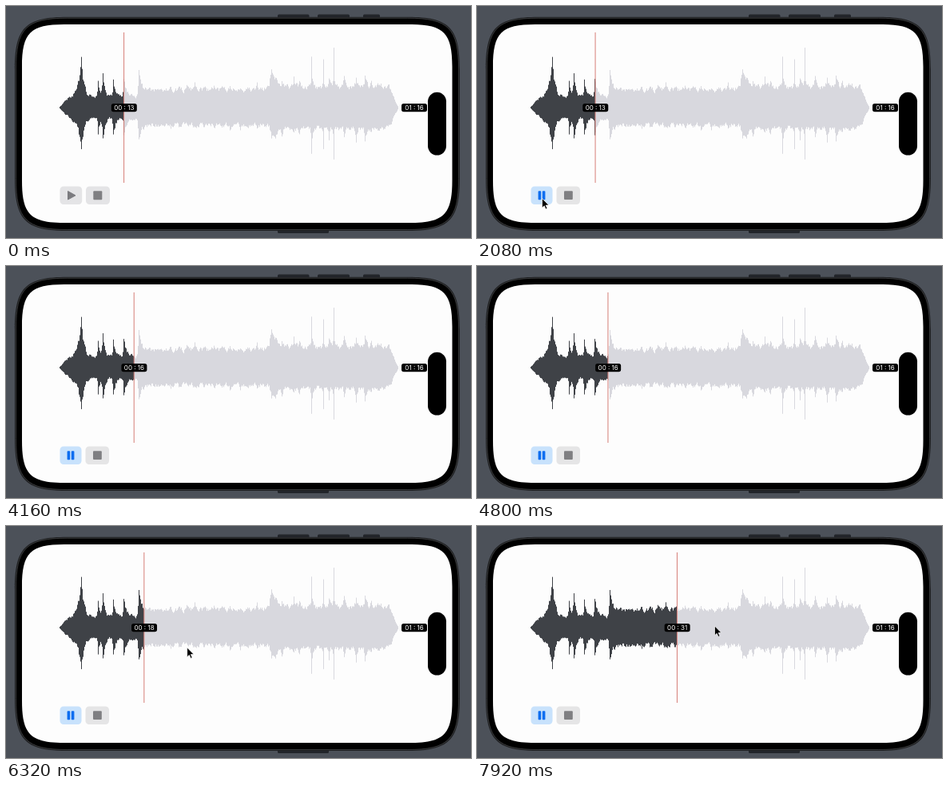
Animation, 582 px wide and 290 px high, one loop 8000 ms. Source, as an HTML page:

```html
<!DOCTYPE html>
<html lang="en">
<head>
<meta charset="utf-8">
<title>Audio player</title>
<style>
  html, body { margin: 0; width: 100%; height: 100%; overflow: hidden; background: #4c5159; }
  svg { display: block; width: 582px; height: 290px; }
  text { font: 400 8px Inter, "Liberation Sans", sans-serif; fill: #fff; text-anchor: middle; white-space: pre; }
  .wave { fill: none; stroke-width: 1; }
</style>
</head>
<body>
<svg viewBox="0 0 582 290">
  <defs>
    <clipPath id="played"><rect id="playedRect" x="60" y="30" width="88" height="200"/></clipPath>
  </defs>

  <!-- phone -->
  <g fill="#22252a">
    <rect x="340" y="10.500" width="39.500" height="5" rx="1.500"/>
    <rect x="390" y="10.500" width="40" height="5" rx="1.500"/>
    <rect x="447" y="10.500" width="21" height="5" rx="1.500"/>
    <rect x="340" y="279" width="64" height="5" rx="1.500"/>
  </g>
  <path id="rim" fill="#1d1e20"/>
  <path id="bezel" fill="#000" stroke="#4b4c4e" stroke-width=".7"/>
  <path id="screen" fill="#fdfdfd"/>
  <rect x="528" y="107.800" width="23" height="78.800" rx="11.500" fill="#000"/>

  <!-- waveform -->
  <path class="wave" id="rest" stroke="#d8d8de"/>
  <path class="wave" id="done" stroke="#3f4247" clip-path="url(#played)"/>
  <rect id="line" y="33" width="1" height="188" fill="#d67f78"/>

  <g id="clock">
    <rect x="-16" y="122" width="32" height="10.300" rx="2.700"/>
    <text id="time" y="130">00 : 13</text>
  </g>
  <g transform="translate(511 0)">
    <rect x="-16" y="122" width="32" height="10.300" rx="2.700"/>
    <text y="130">01 : 16</text>
  </g>

  <!-- buttons -->
  <g id="idle">
    <rect x="67.500" y="225.500" width="27.700" height="22.500" rx="4.500" fill="#e4e4e6"/>
    <path d="M77.500 231.500 L87 236.800 L77.500 242Z" fill="#7b7b7f" stroke="#7b7b7f" stroke-linejoin="round"/>
    <rect x="100" y="225.500" width="30" height="22.500" rx="4.500" fill="#e4e4e6"/>
    <rect x="109.300" y="231.300" width="11" height="11" rx="1" fill="#7f7f82"/>
  </g>
  <g id="playing">
    <rect x="67.500" y="225.500" width="27" height="22.500" rx="4.500" fill="#c8e2fc"/>
    <g fill="#0d6ef0">
      <rect x="76.600" y="231.300" width="3.600" height="11" rx=".8"/>
      <rect x="81.800" y="231.300" width="3.600" height="11" rx=".8"/>
    </g>
    <rect x="99.500" y="225.500" width="29.500" height="22.500" rx="4.500" fill="#e5e5e6"/>
    <rect x="109" y="231.300" width="10.800" height="10.800" rx="1" fill="#7f7f82"/>
  </g>

  <g id="cursor">
    <path d="M0 0V13.500L3.100 10.700L5.200 15.400L7.400 14.400L5.300 9.900L9.600 9.700Z" transform="scale(.87)"
          fill="#000" stroke="#fff" stroke-width=".8" stroke-linejoin="round"/>
  </g>
</svg>

<script>
const $ = id => document.getElementById(id);
const LOOP = 8000, STEP = 80, MID = 127, FIRST = 67, LAST = 490;
const ORIGIN = 66.6, SPEED = 5.84; // track start, px per second
const PLAY = 2000, GRAB = 6640, DROP = 7360;

const clamp = k => Math.min(1, Math.max(0, k));
const mix = (a, b, k) => a + (b - a) * k;
const ease = k => k * k * (3 - 2 * k);
let seed = 11;
const random = () => (seed = (seed * 16807) % 2147483647) / 2147483647;

// rectangle with continuous corners, whose curve reaches further than an arc
function squircle(x, y, w, h, radius) {
  const e = radius * 1.465, k = e * 0.8, m = e - k;
  return `M${x + e} ${y}h${w - 2 * e}c${k} 0 ${e} ${m} ${e} ${e}` +
    `v${h - 2 * e}c0 ${k} ${-m} ${e} ${-e} ${e}` +
    `h${2 * e - w}c${-k} 0 ${-e} ${-m} ${-e} ${-e}` +
    `v${2 * e - h}c0 ${-k} ${m} ${-e} ${e} ${-e}z`;
}
$("rim").setAttribute("d", squircle(11, 13.700, 557, 267.300, 45));
$("bezel").setAttribute("d", squircle(12.500, 15.200, 554, 264.300, 43.500));
$("screen").setAttribute("d", squircle(20, 23, 538.500, 248, 36));

// loud moments: x, height, attack and decay in px
const bursts = [
  [94, 42, 4, 3.500], [115, 22, 0.700, 2], [121, 29, 1, 2.500], [134, 20, 0.800, 3],
  [147, 21, 0.700, 4], [166, 26, 0.700, 3], [332, 18, 2, 3],
  [382, 36, 0.500, 0.700], [397, 32, 0.500, 0.500], [410, 46, 0.500, 0.500]
];
for (let x = 180; x < 476; x += 11) {
  bursts.push([Math.round(x + 5 * random()), (x < 330 ? 9 : 17) * random(), 1, 1.500]);
}

function loudness(x) {
  const base = x < 165 ? 13 : x < 330 ? 22 : 26;
  const fade = clamp((x - FIRST + 1) / 13) * clamp((LAST + 1 - x) / 12);
  return fade * bursts.reduce((sum, [center, height, attack, decay]) => {
    const d = x - center;
    return sum + height * Math.exp(d < 0 ? d / attack : -d / decay);
  }, base);
}

function edge(gain) {
  let drift = 0;
  return x => {
    drift = 0.55 * drift + 0.24 * (random() - 0.5);
    return gain * loudness(x) * (1 + drift);
  };
}

function wavePath() {
  const up = edge(1), down = edge(0.97);
  let d = "";
  for (let x = FIRST; x <= LAST; x++) {
    d += `M${x + 0.5} ${(MID - up(x)).toFixed(1)}V${(MID + down(x)).toFixed(1)}`;
  }
  return d;
}
const wave = wavePath();
$("rest").setAttribute("d", wave);
$("done").setAttribute("d", wave);

// pointer key points: time, x, y
const press = [[1040, 104, 286], [1680, 81.5, 240.5], [2320, 81.5, 240.5], [2720, 96, 291]];
const drag = [[6080, 248, 267], [6320, 226.7, 152], [GRAB, 225, 126], [7280, 297.5, 125]];

function along(path, t) {
  const i = Math.max(1, path.findIndex(p => p[0] > t));
  const [p, q] = t >= path.at(-1)[0] ? [path.at(-1), path.at(-1)] : [path[i - 1], path[i]];
  const k = p === q ? 1 : ease(clamp((t - p[0]) / (q[0] - p[0])));
  return { x: mix(p[1], q[1], k), y: mix(p[2], q[2], k) };
}

function pointer(t) {
  if (t >= drag[0][0]) return along(drag, t);
  if (t >= press[0][0] && t < press.at(-1)[0]) return along(press, t);
  return null;
}

// runs while playing, follows the pointer while dragged
function playhead(t) {
  const playing = Math.max(0, Math.min(t, GRAB) - PLAY) + Math.max(0, t - DROP);
  const dragged = t > GRAB ? pointer(t).x - drag[2][1] : 0;
  return 147.6 + SPEED * playing / 1000 + dragged;
}

function draw(t) {
  const x = playhead(t);
  const seconds = Math.floor((x - ORIGIN) / SPEED);
  $("line").setAttribute("x", x - 0.5);
  $("playedRect").setAttribute("width", x - 60);
  $("clock").setAttribute("transform", `translate(${x + 0.2} 0)`);
  $("time").textContent = "00 : " + String(seconds).padStart(2, "0");

  const on = t > PLAY;
  $("idle").style.display = on ? "none" : "";
  $("playing").style.display = on ? "" : "none";

  const tip = pointer(t);
  $("cursor").style.display = tip ? "" : "none";
  if (tip) $("cursor").setAttribute("transform", `translate(${tip.x} ${tip.y})`);
}

const start = performance.now();
function tick() {
  const t = (performance.now() - start) % LOOP;
  draw(Math.floor(t / STEP) * STEP);
  requestAnimationFrame(tick);
}
tick();
</script>
</body>
</html>
```
